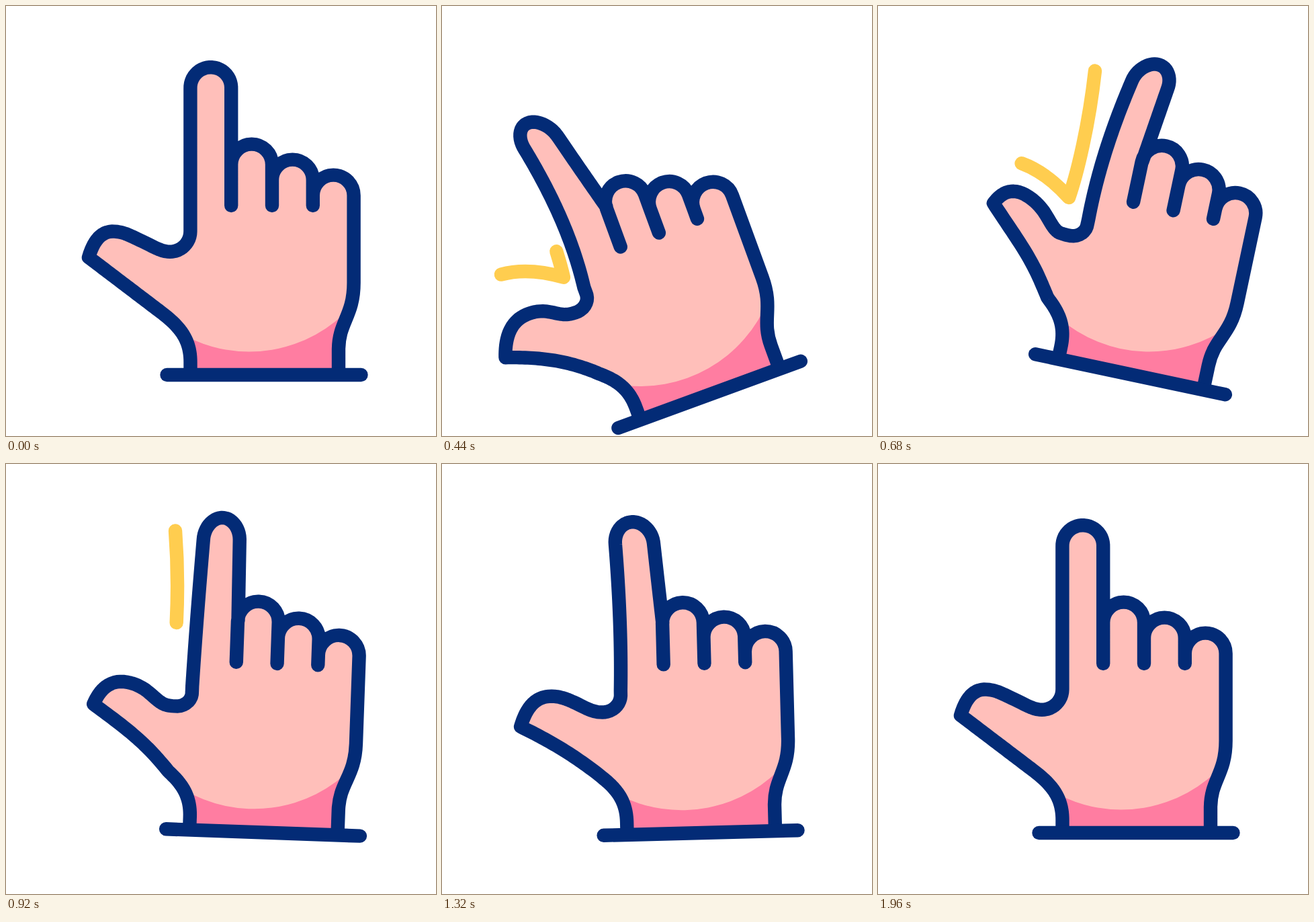
Write an HTML page that moves like this. It is 640 px wide and 640 px high and loops after 2 s.

```html
<!DOCTYPE html>
<html lang="en">
<head>
<meta charset="utf-8">
<title>Pointing hand</title>
<style>
  html, body { margin: 0; width: 100%; height: 100%; overflow: hidden; background: #fff; }
  svg { display: block; width: 100vw; height: 100vh; }
  .line { fill: none; stroke: #032b76; stroke-width: 20.4; stroke-linecap: round; stroke-linejoin: round; }
  #trail { fill: none; stroke: #ffcd4f; stroke-width: 20.4; stroke-linecap: round; stroke-linejoin: round; }
</style>
</head>
<body>
<svg viewBox="0 0 640 640">
  <defs><clipPath id="inside"><path id="clip"/></clipPath></defs>
  <g id="hand">
    <path id="trail" pathLength="1" d="M154 274.6C182 277 212 290 240 310.5C245 270 247 190 237.5 105"/>
    <path id="skin" fill="#ffbfba"/>
    <path clip-path="url(#inside)" fill="#ff7da1" d="M262 488.5A205 205 0 0 0 515 446V549H262Z"/>
    <path id="outline" class="line"/>
    <path class="line" d="M239.5 549H528.5"/>
  </g>
</svg>
<script>
const FRAME = 40, FRAMES = 50, STEP = 4;
const PIVOT = [384.5, 508];
const R = 30.4;                 // half the width of a finger
const AXIS = 304.8;             // middle of the index finger
const $ = id => document.getElementById(id);
const clamp = u => Math.min(1, Math.max(0, u));
const ease = u => (1 - Math.cos(Math.PI * clamp(u))) / 2;
const mix = (a, b, u) => a + (b - a) * u;

// The hand swings like a damped pendulum; finger and thumb lag behind.
const keys = [
  { at: 2,  angle: 0,     drop: 0,  sway: 0,   thumb: 0,   squeeze: 0 },
  { at: 10, angle: -21.4, drop: 33, sway: -38, thumb: 21,  squeeze: 1 },
  { at: 18, angle: 13.3,  drop: -1, sway: 26,  thumb: -34, squeeze: 1 },
  { at: 28, angle: -9.2,  drop: 0,  sway: -21, thumb: 20,  squeeze: 1 },
  { at: 38, angle: 6.2,   drop: 0,  sway: 0,   thumb: 0,   squeeze: 0 },
  { at: 46, angle: 0,     drop: 0,  sway: 0,   thumb: 0,   squeeze: 0 }
];

function pose(f) {
  let i = 0;
  while (i < keys.length - 2 && f >= keys[i + 1].at) i++;
  const a = keys[i], b = keys[i + 1], u = ease((f - a.at) / (b.at - a.at));
  const p = {};
  for (const name in a) p[name] = mix(a[name], b[name], u);
  return p;
}

const probe = document.createElementNS('http://www.w3.org/2000/svg', 'path');

function sample(d) {
  probe.setAttribute('d', d);
  const length = probe.getTotalLength(), n = Math.ceil(length / STEP);
  return Array.from({ length: n + 1 }, (_, i) => probe.getPointAtLength(length * i / n));
}

// Bends a point of the resting hand: sideways along the finger, up or down along the thumb.
function warp({ x, y }, { sway, thumb, squeeze }) {
  const reach = clamp((335 - y) / 244);
  const index = y < 400 ? clamp((x - 190) / 64) : 0;
  const bend = x > AXIS ? clamp((236 - y) / 145) : reach ** 2 + 0.2 * (1 - reach) ** 3;
  const taper = squeeze * (x - AXIS) * (0.13 - 0.28 * reach);
  const lift = (10 * squeeze + 0.25 * thumb) * reach ** 2;

  const k = clamp((240 - x) / 117), dy = thumb * k * k;
  const slide = Math.sin(Math.PI * k) * (10 * squeeze - 0.2 * thumb) - 0.28 * dy;
  return (x + index * (sway * bend + taper) + slide).toFixed(2) + ' ' +
    (y + dy - index * lift).toFixed(2);
}

function softSide(p) {
  const web = R - 10 * p.squeeze, left = AXIS - R;
  const index = `M335.2 236V121.6A${R} ${R} 0 0 0 ${left} 121.6V${365.8 - web}` +
    `A${web} ${web} 0 0 1 ${left - web} 365.8` +
    'C230 365.8 218 357 197 347.5C184 341.5 175 336 160 335.5C139 335 129 354 123 374';
  const wrist = 'M123 374L227 453C258 476 274.5 495 274.5 530V546';
  return 'L' + [...sample(index), ...sample(wrist)].map(q => warp(q, p)).join('L');
}

const arc = (x, y) => `A${R} ${R} 0 0 0 ${x} ${y}`;
const palm = 'V512C495 470 517.6 462 517.6 412V282' + arc(456.8, 282);

function draw(f) {
  const p = pose(f), side = softSide(p);
  const fill = 'M335.2 236' + side + 'H495' + palm +
    'V259' + arc(396, 259) + 'V236' + arc(335.2, 236) + 'Z';
  $('skin').setAttribute('d', fill);
  $('clip').setAttribute('d', fill);
  $('outline').setAttribute('d', 'M335.2 297V236' + side +
    'M495 546' + palm + 'V297' +
    'M456.8 282V259' + arc(396, 259) + 'V297' +
    'M396 259V236' + arc(335.2, 236));
  $('hand').setAttribute('transform', `translate(0 ${p.drop}) rotate(${p.angle} ${PIVOT})`);

  const head = ease((f - 4) / 15), tail = ease((f - 15.7) / 13.8);
  const trail = $('trail').style;
  trail.visibility = head - tail > 0.001 ? 'visible' : 'hidden';
  trail.strokeDasharray = `${head - tail} 3`;
  trail.strokeDashoffset = -tail;
}

const start = performance.now();
let shown = -1;
function tick() {
  const f = Math.floor((performance.now() - start) / FRAME) % FRAMES;
  if (f !== shown) draw(shown = f);
  requestAnimationFrame(tick);
}
tick();
</script>
</body>
</html>
```
